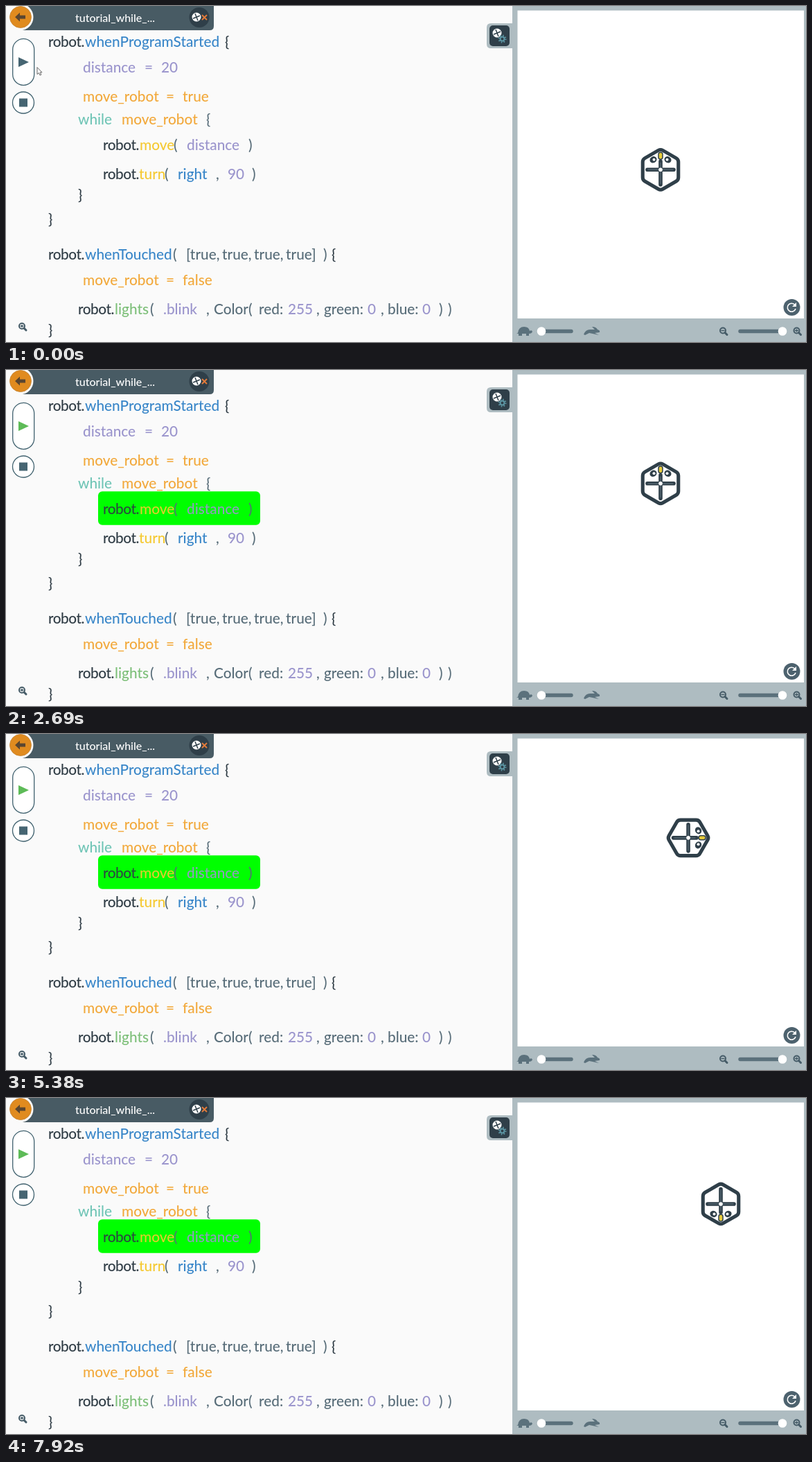
Animation of 1155x485 px, one loop 8000 ms. Source, as an HTML page:

```html
<!DOCTYPE html>
<html lang="en">
<head>
<meta charset="utf-8">
<style>
html, body { margin: 0; width: 1155px; height: 485px; overflow: hidden; background: #fafafa; }
svg { display: block; }
text { font: 500 20.8px Lato, "Open Sans", sans-serif; white-space: pre; }
</style>
</head>
<body>
<svg width="1155" height="485" viewBox="0 0 1155 485">
  <defs>
    <g id="lens" fill="none" stroke="#465c68" stroke-width="2" stroke-linecap="round">
      <circle r="4"/><path d="M3 3L6 6" stroke-width="3"/><path d="M-2 0H2" stroke-width="1.5"/>
    </g>
    <g id="mini">
      <circle r="6.5" fill="#fff"/>
      <path d="M-5 2L5 -2M-2 -5L2 5" stroke="#2f3f49" stroke-width="1.5"/>
    </g>
    <path id="hex" d="M0 -22.4L19.4 -11.2V11.2L0 22.4L-19.4 11.2V-11.2Z" stroke-linejoin="round"/>
    <g id="eye">
      <ellipse cx="10.5" cy="-14.5" rx="5.2" ry="4.5" fill="#2f3f49" transform="rotate(30 10.5 -14.5)"/>
      <circle cx="9.5" cy="-14.5" r="2" fill="#fff"/>
    </g>
  </defs>

  <!-- Title tab -->
  <path d="M21 0H300V29Q300 35 294 35H21Z" fill="#485b64"/>
  <circle cx="20" cy="16" r="19.5" fill="#fafafa"/>
  <circle cx="21" cy="16" r="15.5" fill="#e08b1f" stroke="#c58333" stroke-width=".8"/>
  <path d="M13 16L20 9.5V13.5H28V18.5H20V22.5Z" fill="#5a4630"/>
  <text x="100" y="23" fill="#fff" style="font-size:16px">tutorial_while_...</text>
  <circle cx="279" cy="16.5" r="14.5" fill="#2f3f49"/>
  <use href="#mini" x="275" y="16"/>
  <path d="M283 13L290 20M290 13L283 20" stroke="#e27a3a" stroke-width="2"/>

  <!-- Run controls -->
  <g fill="#fff" stroke="#41626f" stroke-width="1.3">
    <rect x="9.7" y="47.3" width="31" height="67" rx="15.5"/>
    <circle cx="25" cy="139.5" r="15.5"/>
  </g>
  <path id="play" d="M18 74L33 81L18 88Z"/>
  <rect x="19" y="133.5" width="12" height="12" fill="#466572"/>
  <use href="#lens" x="23" y="462"/><path d="M23 460V464" stroke="#465c68" stroke-width="1.5"/>

  <!-- Code -->
  <rect id="mark" x="133" height="48.5" rx="6" fill="#0f0"/>
  <g id="code"></g>

  <!-- Simulator -->
  <path d="M731 0H1155V485H731V61H700Q694 61 694 55V31Q694 25 700 25H731Z" fill="#aebcc1"/>
  <rect x="738.5" y="6.5" width="413.5" height="444.5" fill="#fff"/>
  <rect x="698" y="28" width="29" height="30" rx="5" fill="#2f3f49"/>
  <use href="#mini" x="709" y="39"/>
  <circle cx="716.5" cy="47.5" r="3" fill="none" stroke="#5d97a5" stroke-width="2"/>
  <circle cx="716.5" cy="47.5" r="5" fill="none" stroke="#5d97a5" stroke-width="2" stroke-dasharray="1.6 2.33"/>
  <circle cx="1134.5" cy="435" r="12" fill="#4d626e"/>
  <path d="M1139 431.5A6 6 0 1 0 1140 437" fill="none" stroke="#fff" stroke-width="1.6"/>
  <path d="M1141 428V434H1135Z" fill="#fff"/>
  <g fill="#5b717c">
    <path d="M739 472Q740 463 748 463Q755 463 756 469Q759 467 760 470Q759 473 755 473V476H751V473H745V476H740V473L737 473Z"/>
    <path d="M834 474Q837 466 845 467L850 467L846 463Q852 463 854 467Q858 468 857 471L850 472L856 475L847 473L842 472L836 475Z"/>
  </g>
  <path d="M773 469.5H816M1060 469.5H1121" stroke="#5b717c" stroke-width="5.5" stroke-linecap="round"/>
  <circle cx="773" cy="469.5" r="6.3" fill="#fff"/>
  <circle cx="1121" cy="469.5" r="6.3" fill="#fff"/>
  <use href="#lens" x="1035" y="468.5"/>
  <use href="#lens" x="1141.5" y="468.5"/><path d="M1141.5 466.5V470.5" stroke="#465c68" stroke-width="1.5"/>

  <g id="robot">
    <use href="#hex" fill="#2f3f49" stroke="#2f3f49" stroke-width="17.8"/>
    <use href="#hex" fill="#fff" stroke="#fff" stroke-width="7.6"/>
    <g stroke-linecap="round">
      <path d="M0 -12V21.5M-19 0H19" stroke="#2f3f49" stroke-width="5.6"/>
      <path d="M0 -10V20M-18 0H18" stroke="#5a6d78" stroke-width="1.2"/>
      <path d="M0 -22V-18" stroke="#2f3f49" stroke-width="7.5"/>
      <path d="M0 -22V-18" stroke="#e6cb3a" stroke-width="4.5"/>
    </g>
    <circle r="2.8" fill="#fff"/>
    <use href="#eye"/><use href="#eye" transform="scale(-1 1)"/>
  </g>
  <path id="cursor" d="M0 0V10L2.5 8L4 11.5L5.8 10.700L4.3 7.3H7Z" fill="#fff" stroke="#555" stroke-width=".9"/>
</svg>

<script>
const el = id => document.getElementById(id);
const COLORS = {
  dark: '#2f3c45', slate: '#586d79', blue: '#3a87c9', purple: '#9b95cd',
  orange: '#f2a93c', teal: '#70c5b6', yellow: '#f5c931', green: '#7dbf79'
};

// Each row: baseline, then "x color text" tokens.
const ROWS = [
  [59, '61 dark robot.', '114 blue whenProgramStarted', '316 dark {'],
  [96, '111 purple distance', '200 purple =', '224 purple 20'],
  [138, '111 orange move_robot', '231 orange =', '255 orange true'],
  [171, '104 teal while', '167 orange move_robot', '289 slate {'],
  [208, '140 dark robot.', '193 yellow move', '242 slate (', '261 purple distance', '350 slate )'],
  [250, '140 dark robot.', '192 yellow turn', '229 slate (', '248 blue right', '303 slate ,', '320 purple 90', '355 slate )'],
  [280, '104 dark }'],
  [315, '61 dark }'],
  [366, '61 dark robot.', '114 blue whenTouched', '241 slate (', '260 slate [true,', '312 slate true,',
    '358 slate true,', '404 slate true]', '458 slate )', '470 dark {'],
  [403, '111 orange move_robot', '231 orange =', '255 orange false'],
  [445, '104 dark robot.', '157 green lights', '208 slate (', '227 purple .blink', '289 slate ,', '300 slate Color(',
    '365 slate red:', '407 purple 255', '448 slate ,', '459 slate green:', '522 purple 0', '541 slate ,',
    '551 slate blue:', '601 purple 0', '625 slate )', '638 slate )'],
  [475, '61 dark }']
];
el('code').innerHTML = ROWS.map(([y, ...tokens]) => `<g>${tokens.map(token => {
  const [x, color, text] = token.split(' ');
  const spacing = text === 'robot.' ? -0.5 : 0;
  return `<text x="${x}" y="${y}" fill="${COLORS[color]}" letter-spacing="${spacing}">${text}</text>`;
}).join('')}</g>`).join('');
const [moveRow, turnRow] = [el('code').children[4], el('code').children[5]];

// Linear interpolation through [time, ...values] keys, clamped at both ends.
function track(keys, t) {
  const next = keys.findIndex(key => key[0] > t);
  if (next < 0) return keys.at(-1).slice(1);
  if (next === 0) return keys[0].slice(1);
  const a = keys[next - 1], b = keys[next];
  const k = (t - a[0]) / (b[0] - a[0]);
  return a.slice(1).map((v, i) => v + (b[i + 1] - v) * k);
}

// time, x, y, heading
const ROBOT = [
  [950, 945, 236.3, 0], [3030, 945, 149.7, 0], [3425, 945, 149.7, 0], [4145, 945.5, 149.7, 90],
  [4430, 945.5, 149.7, 90], [6510, 1032, 150, 90], [6910, 1032, 150, 90], [7630, 1032, 150, 180],
  [7850, 1032, 150, 180], [9930, 1032, 237, 180]
];
const CURSOR = [
  [80, 45, 88.5], [210, 21, 73], [1140, 21, 73], [1450, 81, 29], [1530, 87, 33], [2000, 1, 414], [2100, -15, 425]
];

function draw(t) {
  const [x, y, heading] = track(ROBOT, t);
  el('robot').setAttribute('transform', `translate(${x} ${y}) rotate(${heading})`);
  el('cursor').setAttribute('transform', `translate(${track(CURSOR, t)})`);
  el('play').setAttribute('fill', t < 360 ? '#466572' : '#5dbb57');

  const turning = (t >= 3060 && t < 4200) || (t >= 6540 && t < 7700);
  const moving = t >= 720 && !turning;
  const mark = el('mark');
  mark.setAttribute('visibility', moving || turning ? 'visible' : 'hidden');
  mark.setAttribute('y', turning ? 217.5 : 175.3);
  mark.setAttribute('width', turning ? 240 : 234);
  moveRow.setAttribute('opacity', moving ? .93 : 1);
  turnRow.setAttribute('opacity', turning ? .93 : 1);
}

function tick() {
  draw(performance.now() % 8000);
  requestAnimationFrame(tick);
}
tick();
</script>
</body>
</html>
```
